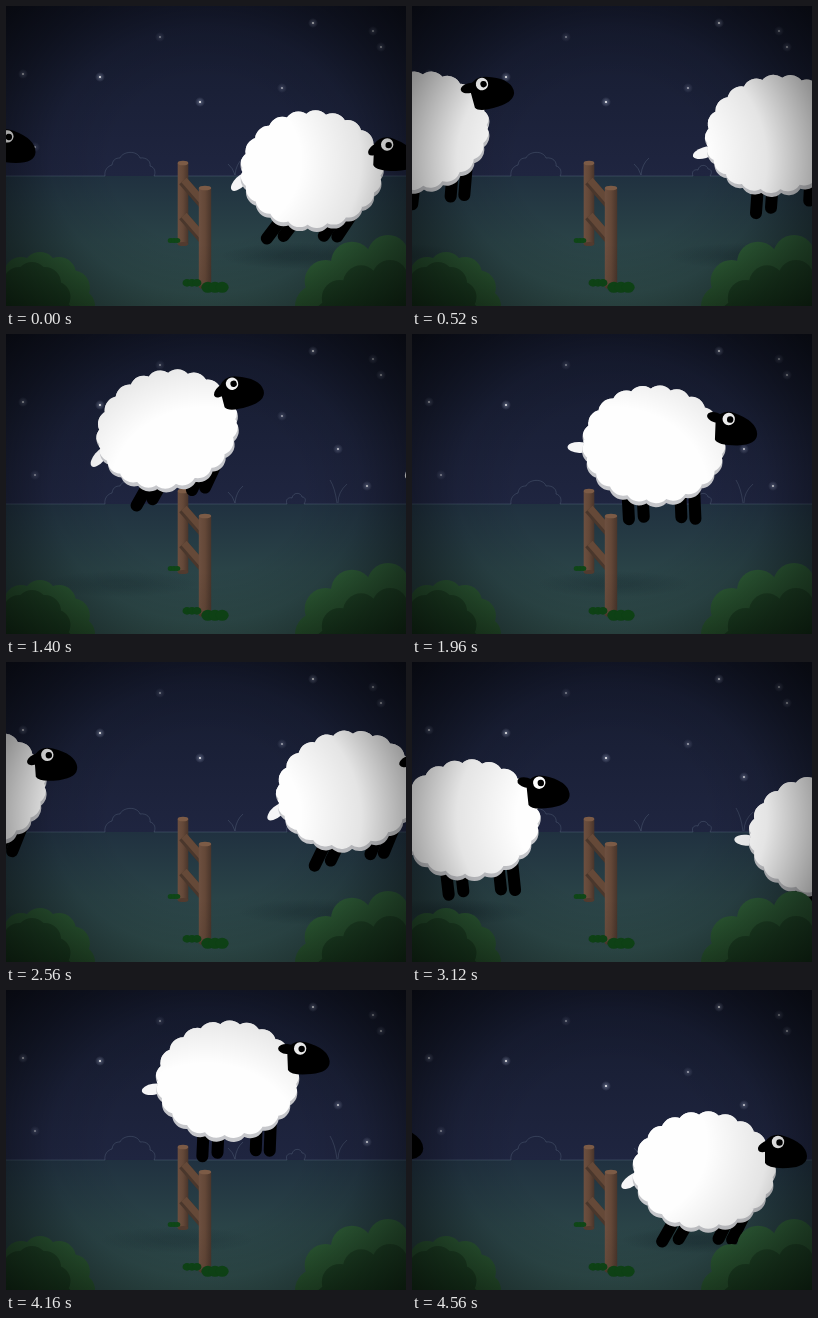
Recreate the animation shown at these times as an HTML page with a canvas. Size 400 by 300 pixels, loop 4600 ms.

```html
<!DOCTYPE html>
<html>
<head>
<meta charset="utf-8">
<style>
  html, body { margin: 0; height: 100%; overflow: hidden; background: #0b0e1a; }
  canvas { display: block; width: 400px; height: 300px; }
</style>
</head>
<body>
<canvas id="stage" width="400" height="300"></canvas>
<script>
const ctx = document.getElementById('stage').getContext('2d');
const LOOP = 4600, PERIOD = 2320, TAU = Math.PI * 2, DEG = Math.PI / 180;
const GROUND = 182;

// A sheep crosses the stage in four hops; the second clears the fence
const HOPS = [
  { start: -130, end: 920, from: -104, to: 84, height: 59, pitch: 0 },
  { start: 1080, end: 2200, from: 97, to: 292, height: 104, pitch: 7 },
  { start: 2250, end: 3150, from: 292, to: 414, height: 58, pitch: 0 },
  { start: 3400, end: 4300, from: 430, to: 540, height: 80, pitch: 7 }
];

const mix = (a, b, u) => a + (b - a) * u;

function pose(t) {
  const i = HOPS.findLastIndex(h => h.start <= t), hop = HOPS[i], next = HOPS[i + 1];
  if (t >= hop.end && next) {
    const u = (t - hop.end) / (next.start - hop.end);
    return { x: mix(hop.to, next.from, u), lift: 0, tilt: 0, nod: 0, swing: mix(-8, 38, u) * DEG, fall: mix(1, -1, u) };
  }
  const u = (t - hop.start) / (hop.end - hop.start), wave = Math.sin(TAU * u), fall = -Math.cos(Math.PI * u);
  return {
    x: mix(hop.from, hop.to, u) + 9 * wave,
    lift: hop.height * 4 * u * (1 - u),
    tilt: (-12 * Math.sin(Math.PI * u) ** 2 - hop.pitch * wave) * DEG,
    nod: (7 - hop.pitch) * wave * DEG,
    swing: (15 - 23 * fall) * DEG,
    fall
  };
}

function ellipse(x, y, rx, ry, color) {
  ctx.fillStyle = color;
  ctx.beginPath();
  ctx.ellipse(x, y, rx, ry, 0, 0, TAU);
  ctx.fill();
}

function line(width, color, x0, y0, x1, y1) {
  ctx.lineWidth = width;
  ctx.strokeStyle = color;
  ctx.beginPath();
  ctx.moveTo(x0, y0);
  ctx.lineTo(x1, y1);
  ctx.stroke();
}

// Runs a drawing with its own origin and rotation
function at(x, y, angle, paint) {
  ctx.save();
  ctx.translate(x, y);
  ctx.rotate(angle);
  paint();
  ctx.restore();
}

function stops(gradient, colors) {
  colors.forEach((c, i) => gradient.addColorStop(i / (colors.length - 1), c));
  return gradient;
}
const linear = (x0, y0, x1, y1, ...colors) => stops(ctx.createLinearGradient(x0, y0, x1, y1), colors);
const radial = (x, y, r0, r1, ...colors) => stops(ctx.createRadialGradient(x, y, r0, x, y, r1), colors);

const wool = new Path2D();
wool.ellipse(0, 0, 62, 51, 0, 0, TAU);
for (let a = 0; a < TAU; a += TAU / 21) {
  const x = 58 * Math.cos(a), y = 47 * Math.sin(a);
  wool.moveTo(x + 14, y);
  wool.arc(x, y, 14, 0, TAU);
}
const face = new Path2D('M61 -30Q68 -40 80 -36Q102 -29 103 -16Q103 -5 84 -4Q64 -3 61 -9Z');
const outlines = new Path2D(`M0 170H99C98 164 102 160 106 159C107 152 112 152 114 152
  C117 145 131 144 134 152C141 151 145 156 144 160C149 161 150 167 148 170H281
  C279 165 283 163 286 164C287 158 295 158 296 163C300 163 300 167 298 170H400
  M229 169Q227 162 222 158M229 169Q230 158 237 152
  M331 169Q329 154 324 146M332 169Q332 158 341 150`);

const STARS = [[94, 71], [194, 96], [307, 17], [361, 152], [332, 115], [17, 68], [375, 41], [367, 25],
  [276, 82], [29, 141], [154, 31]];

function background() {
  ctx.fillStyle = linear(0, 0, 0, 170, '#151a2e', '#1a2037', '#1f2540');
  ctx.fillRect(0, 0, 400, 170);
  ctx.fillStyle = linear(0, 170, 0, 300, '#203140', '#2a4347', '#2f4c4a');
  ctx.fillRect(0, 170, 400, 130);
  ctx.lineWidth = 1;
  ctx.strokeStyle = 'rgba(130,150,170,.24)';
  ctx.stroke(outlines);
  STARS.forEach(([x, y], i) => {
    ctx.globalAlpha = .95 - i * .055;
    ellipse(x, y, 5, 5, radial(x, y, 0, 5, 'rgba(190,200,230,.45)', 'rgba(190,200,230,0)'));
    ellipse(x, y, 1.1, 1.1, '#fff');
  });
  ctx.globalAlpha = 1;
}

function shadow({ x, lift }) {
  ctx.save();
  ctx.translate(x - 5 - lift * .5, 250);
  ctx.scale(1, .17);
  ellipse(0, 0, 78, 78, radial(0, 0, 20, 78, `rgba(8,20,28,${.26 - lift * .0012})`, 'rgba(8,20,28,0)'));
  ctx.restore();
}

function leg(x, length, swing) {
  line(12, '#000', x, 40, x - length * Math.sin(swing), 40 + length * Math.cos(swing));
}

function sheep({ x, lift, tilt, nod, swing, fall }) {
  at(x, GROUND - lift, tilt, () => {
    const legSwing = swing - tilt;
    ctx.lineCap = 'round';
    leg(-10, 31, legSwing);
    leg(28, 30, legSwing * .9);
    leg(-25, 34, legSwing);
    leg(42, 31, legSwing * .9);

    at(-66, 4, (fall * 25 - 20) * DEG, () => ellipse(-8, 0, 12, 5.5, '#f6f6f7'));

    ctx.fillStyle = '#c6c7cb';
    ctx.fill(wool);
    ctx.save();
    ctx.clip(wool);
    ctx.translate(0, -4);
    ctx.fillStyle = '#fefefe';
    ctx.fill(wool);
    ctx.restore();

    at(0, 0, nod, () => {
      ctx.fillStyle = '#000';
      ctx.fill(face);
      at(68, -30, (fall * 30 - 8) * DEG, () => ellipse(-7, 1, 9, 5, '#000'));
      ellipse(74, -30, 6.2, 6.2, '#fff');
      ellipse(75.5, -29.5, 3.2, 3.2, '#000');
    });
  });
}

function post(x, top, bottom, w) {
  ctx.fillStyle = linear(x - w, 0, x + w, 0, '#6d5040', '#644838', '#49352b');
  ctx.fillRect(x - w, top, w * 2, bottom - top);
  ellipse(x, bottom, w, 2, '#523b2f');
  ellipse(x, top, w, 2.3, '#7c5b46');
}

function rail(y) {
  ctx.lineCap = 'butt';
  line(10, '#4a372c', 177, y, 197, y + 23);
  line(7, '#654938', 178, y - 1, 198, y + 22);
}

function tuft(x, y, w) {
  for (const k of [-.55, 0, .55]) ellipse(x + k * w, y + w * .1, w * .5, w * .42, '#0f4717');
}

// A half ellipse edged with round lumps
function mound(x, y, rx, ry, lump, color) {
  ellipse(x, y, rx, ry, color);
  for (let i = 0; i < 7; i++) {
    const a = Math.PI * (1 + i / 6);
    ellipse(x + rx * Math.cos(a), y + ry * Math.sin(a), lump, lump, color);
  }
}

function foreground() {
  const back = linear(0, 228, 0, 300, '#30603a', '#27522d'), front = linear(0, 250, 0, 300, '#22482a', '#1a3d20');
  mound(34, 300, 38, 37, 17, back);
  mound(26, 310, 26, 38, 16, front);
  mound(382, 300, 72, 50, 21, back);
  mound(384, 312, 58, 40, 18, front);
}

function vignette() {
  ctx.save();
  ctx.translate(200, 155);
  ctx.scale(1, .86);
  ctx.fillStyle = radial(0, 0, 95, 275, 'rgba(0,0,0,0)', 'rgba(0,0,0,.1)', 'rgba(0,0,0,.42)', 'rgba(0,0,0,.68)');
  ctx.fillRect(-200, -185, 400, 360);
  ctx.restore();
}

function draw(now) {
  const phase = now % LOOP % PERIOD;
  const flock = [phase - PERIOD, phase, phase + PERIOD].filter(t => t > -80 && t < 4300).map(pose);
  background();
  flock.forEach(shadow);
  post(177, 157, 238, 5.3);
  tuft(168, 234, 6);
  flock.forEach(sheep);
  rail(175);
  rail(210);
  post(199, 182, 281, 6.2);
  tuft(186, 276, 9);
  tuft(209, 280, 13);
  foreground();
  vignette();
}

const start = performance.now();
function tick() {
  draw(performance.now() - start);
  requestAnimationFrame(tick);
}
tick();
</script>
</body>
</html>
```
